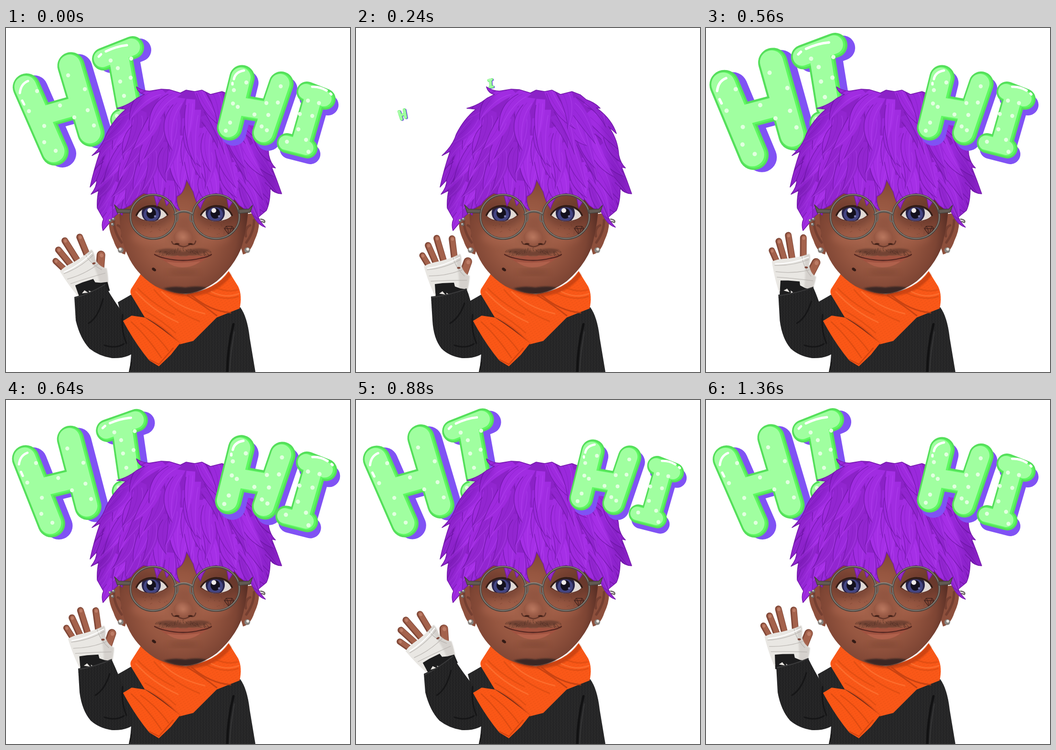
Recreate the animation shown at these times as an HTML page. Size 720 by 720 pixels, loop 1.44 s.

```html
<!DOCTYPE html>
<html lang="en">
<head>
<meta charset="utf-8">
<title>Waving avatar</title>
<style>
html,body{margin:0;width:100%;height:100%;overflow:hidden;background:#fff}
svg{display:block;width:100vw;height:100vh}
</style>
</head>
<body>
<svg id="stage" viewBox="0 0 720 720" fill="none" stroke-linecap="round" stroke-linejoin="round"></svg>
<script>
const LOOP = 1440, STEP = 80;
const svg = document.getElementById('stage');

let seed = 7;
const rnd = (a = 0, b = 1) => {
  seed = (seed * 16807) % 2147483647;
  return a + (b - a) * seed / 2147483647;
};
const path = (d, fill, stroke = 'none', w = 1, more = '') =>
  `<path d="${d}" fill="${fill}" stroke="${stroke}" stroke-width="${w}" ${more}/>`;
const line = (d, stroke, w, more = '') => path(d, 'none', stroke, w, more);
const oval = (x, y, rx, ry, fill, more = '') =>
  `<ellipse cx="${x}" cy="${y}" rx="${rx}" ry="${ry}" fill="${fill}" ${more}/>`;
const grad = (id, stops, at = '') =>
  `<radialGradient id="${id}" ${at}>` + stops.map(([o, c]) => `<stop offset="${o}" stop-color="${c}"/>`).join('') + '</radialGradient>';

// Bubble letters: thick bars [x1,y1,x2,y2,width], dots, shine strokes
function letter(id, bars, dots, shine, shadow) {
  const layer = (color, inset, dx, dy) => `<g transform="translate(${dx} ${dy})">` +
    bars.map(([a, b, c, d, w]) => line(`M${a} ${b}L${c} ${d}`, color, w - inset)).join('') + '</g>';
  return `<g id="${id}">` + layer('#8052f4', 0, ...shadow) + layer('#55df5b', 0, 0, 0) +
    layer('#5ffa62', 8, 0, 0) + layer('#a0ffa0', 12, -2.5, -1) +
    dots.map(([x, y]) => oval(x, y, 4.2, 4.2, '#e2ffe0')).join('') +
    line(shine, '#fff', 5) + '</g>';
}

const HAIR = 'M273 123Q284 131 300 132L325 128L342 129L365 136L377 130L395 133L410 130L428 139L452 133L470 140L482 150Q500 156 511 168L503 167Q535 190 545 221L528 206Q548 232 550 266Q554 284 564 293L556 291Q567 318 577 347Q560 346 553 335Q553 365 545 382L528 396Q534 408 543 417Q528 413 518 394' +
  'L512 383L498 378L488 371L478 358L466 377L462 356L440 346L422 351Q412 362 407 379Q396 362 392 343L378 318Q372 348 358 352Q355 366 364 382Q350 376 345 361L336 372L330 352Q322 358 316 373L310 351L288 346Q270 356 262 370L247 378L243 392L237 386Q222 398 214 411L203 424' +
  'Q199 410 204 400L191 377Q190 357 194 340L178 348Q190 333 190 318L176 333Q184 296 197 258L180 267Q203 246 210 222Q226 190 251 170L232 168Q254 163 274 147L290 139Q277 137 273 123Z';

function locks() {
  const tones = ['#9a29dc', '#a52fe6', '#9226d0', '#a02ce1', '#9e2ade'];
  let out = '';
  for (let y = 365; y > 122; y -= 24) for (let k = 0; k < 12; k++) {
    const x = 190 + k * 33 + rnd(-12, 12), y0 = y + rnd(-12, 12);
    let vx = (x - 382) / 150 + rnd(-.3, .3), vy = .4 + (y0 - 120) / 110;
    const len = rnd(75, 120), h = Math.hypot(vx, vy);
    vx *= len / h; vy *= len / h;
    const w = rnd(13, 21) / len, bend = rnd(-.24, .24);
    const at = (t, s) => (x + vx * t - vy * s).toFixed(1) + ' ' + (y0 + vy * t + vx * s).toFixed(1);
    const side = s => `Q${at(.42, s + bend)} ${at(1, 0)}`;
    out += path(`M${at(0, -w * .7)}Q${at(.5, -w + bend)} ${at(1, 0)}Q${at(.55, w + bend)} ${at(0, w * .7)}Z`, tones[Math.floor(rnd(0, 5))]);
    out += line(`M${at(.15, w * .7)}Q${at(.58, w + bend)} ${at(1, 0)}`, '#7017a8', 1.5, 'opacity=".75"');
    out += line(`M${at(.1, -w * .35)}${side(-w * .5)}`, '#b84cf3', 1.2, 'opacity=".5"');
    out += line(`M${at(.1, w * .25)}${side(w * .3)}`, '#7e1dbb', 1, 'opacity=".55"');
  }
  return out;
}

const eye = (x, id) => `<g clip-path="url(#${id})">` +
  oval(x, 388, 34, 20, '#efece9') + oval(x - 2, 387, 20, 20, '#20204c') + oval(x - 2, 390, 16, 15, '#41478c') +
  oval(x - 2, 388, 10, 11, '#0b0c1c') + oval(x - 5, 382, 5, 5, '#fff') + oval(x + 6, 394, 2.5, 2, '#8087bb') +
  line(`M${x - 32} 384Q${x} 362 ${x + 32} 384`, '#35201c', 6, 'opacity=".45"') + '</g>';

function face() {
  const lens = (x, r) => oval(x, 395, r, 46, '#5b3328', 'opacity=".1"') +
    oval(x, 395, r, 46, 'none', 'stroke="#4b4540" stroke-width="4.5"') +
    oval(x, 394.5, r, 46, 'none', 'stroke="#8f877e" stroke-width="1.6"');
  const ear = (s) => `<g transform="${s}">` +
    path('M246 392Q226 382 216 399Q213 420 225 445Q233 470 249 474L256 450Z', '#8d4f3c') +
    line('M226 402Q225 425 242 449M234 413Q246 418 243 436', '#5d3126', 5, 'opacity=".5"') +
    oval(240, 465, 6, 6, '#86827e') + oval(239, 463, 3, 3, '#e9e6e2') + '</g>';
  let freckles = '';
  for (let i = 0; i < 34; i++) freckles += oval(rnd(0, 56) + (i % 2 ? 284 : 405), rnd(405, 434), .9, .8, '#5e3327', 'opacity=".45"');
  const stubble = [];
  for (let i = 0; i < 130; i++) {
    const u = rnd(-1, 1);
    stubble.push(`M${(371 + u * 56).toFixed(1)} ${(467 + rnd(-4, 5) - 4 * Math.cos(u * 4)).toFixed(1)}l${(u * 3).toFixed(1)} 2`);
  }
  const gem = (x, y) => oval(x, y, 3.3, 3.3, '#6f6c68') + oval(x - 1, y - 1, 1.5, 1.5, '#ddd');
  return ear('') + ear('translate(745 0) scale(-1 1)') +
    path('M234 330L238 400Q240 445 254 474Q271 514 312 540Q344 556 376 556Q408 554 441 530Q476 500 492 462Q502 430 507 385L505 330Q370 270 234 330Z', 'url(#skin)') +
    oval(306, 388, 44, 29, '#512b22', 'opacity=".36" filter="url(#soft)"') +
    oval(440, 388, 44, 29, '#512b22', 'opacity=".36" filter="url(#soft)"') +
    oval(300, 437, 38, 17, '#b96f57', 'opacity=".35" filter="url(#soft)"') +
    oval(436, 437, 34, 17, '#b96f57', 'opacity=".25" filter="url(#soft)"') +
    line('M417 345Q440 333 474 345', '#2c1b18', 7, 'opacity=".75"') +
    `<g id="eyes">${eye(306, 'slitL')}${eye(440, 'slitR')}</g><g id="lids"></g>` + freckles +
    // nose
    path('M357 396Q353 425 345 438Q344 452 358 454Q372 462 387 454Q400 452 398 438Q389 423 387 396Z', '#7b4434', 'none', 0, 'opacity=".4" filter="url(#soft)"') +
    oval(371, 438, 20, 17, 'url(#nose)') + oval(366, 431, 8, 6, '#cd8a70', 'opacity=".55" filter="url(#soft)"') +
    line('M347 447Q349 455 358 452Q371 463 386 452Q395 456 397 446', '#512a21', 2.6, 'opacity=".7"') +
    oval(358, 452, 5, 2, '#32170f', 'opacity=".7"') + oval(386, 452, 5, 2, '#32170f', 'opacity=".7"') +
    // mouth
    path('M314 466Q342 456 371 468Q400 456 427 465Q402 479 371 477Q340 480 314 466Z', '#4a2c24', 'none', 0, 'opacity=".5" filter="url(#tiny)"') +
    line(stubble.join(''), '#3a231d', .8, 'opacity=".5"') +
    path('M318 477Q345 480 359 476Q371 481 383 476Q400 479 425 476Q403 500 370 500Q339 498 318 477Z', '#a05240') +
    path('M336 489Q370 494 407 488Q392 501 368 501Q349 500 336 489Z', '#b0614c') +
    line('M311 474Q319 479 333 482Q371 491 407 482Q424 479 430 474', '#532620', 2.3) +
    oval(371, 511, 32, 4, '#5b3024', 'opacity=".45" filter="url(#soft)"') +
    path('M330 545Q352 539 375 543Q400 539 420 543Q400 556 376 557Q350 556 330 545Z', '#2d2320', 'none', 0, 'opacity=".85" filter="url(#tiny)"') +
    oval(310, 505.5, 4.8, 3, '#341b16', 'transform="rotate(35 310 505)"') +
    line('M457 420L461 415H473L477 420L467 433ZM457 420H477M461 415L464 420L467 433L471 420L473 415', '#43231d', 1.3) +
    '<g id="hair"></g>' +
    lens(308, 47.5) + lens(439.5, 49) +
    line('M353 390Q372 378 391 390', '#5b554f', 5) + line('M354 388Q372 377 390 388', '#9c948a', 1.5) +
    line('M354 405Q361 407 360 390M391 405Q383 408 386 390', '#6d655e', 3) +
    path('M261 380L236 379L227 370L233 387L260 387ZM487 380L508 379L516 371L511 386L488 388Z', '#625a53', '#453f3b', 1.5) +
    gem(223, 411) + gem(218, 403) + gem(225, 400) + line('M533 400Q544 402 541 407L535 405', '#6b6763', 2.5);
}

function scarf() {
  const wool = (d, fill) => path(d, fill) + path(d, 'url(#knit)');
  return wool('M285 510L262 546Q258 553 264 562L290 605Q329 626 364 662L392 655L441 606L489 587Q495 560 486 541L466 509Q440 548 376 557Q316 549 285 510Z', '#fa5818') +
    path('M285 510Q316 549 376 557Q440 548 466 509L472 518Q444 556 390 562Q320 563 285 510Z', '#a4330e', 'none', 0, 'opacity=".5" filter="url(#tiny)"') +
    line('M380 560Q408 576 441 602M389 560Q426 592 470 596', '#b93c10', 3, 'opacity=".75"') +
    line('M276 545Q310 580 352 600M310 548Q345 590 405 614M291 592Q326 612 355 638M420 555Q456 572 486 562M440 544Q465 554 484 548', '#c9450f', 3, 'opacity=".45"') +
    line('M272 552Q307 592 360 616M326 552Q360 585 416 598M430 552Q460 567 487 556', '#ff7a39', 3, 'opacity=".6"') +
    path('M288 604Q330 623 365 662L347 664Q330 630 288 604Z', '#8e2a0b', 'none', 0, 'opacity=".65" filter="url(#tiny)"') +
    wool('M245 613L263 602L291 606Q327 629 364 660L345 684L320 708L300 696Q270 660 245 613Z', '#fb5716') +
    line('M262 615Q295 645 325 690M282 618Q319 645 340 676', '#c4420f', 2.5, 'opacity=".5"') +
    line('M300 694L320 704L350 670', '#b9390c', 2.5, 'opacity=".6"');
}

function hand() {
  const finger = (x1, y1, x2, y2, w) => line(`M${x1} ${y1}L${x2} ${y2}`, '#814838', w) +
    line(`M${x1 + 1} ${y1}L${x2 + 1} ${y2}`, '#a4624c', w - 4) + oval(x1 + 1, y1 + 1, w * .22, w * .25, '#bd7c66');
  return finger(139, 476, 156, 504, 13) + finger(151, 455, 170, 498, 14) + finger(169, 440, 184, 490, 14) +
    finger(201, 441, 207, 490, 14) + finger(234, 489, 222, 522, 18) +
    path('M142 499Q151 493 166 490Q193 485 218 473Q222 481 220 496Q225 514 238 519Q237 536 231 558L166 562Q153 537 142 499Z', '#e9e7e3') +
    path('M207 478L218 473Q222 481 220 496Q225 514 238 519Q237 536 231 558L214 558Q220 530 207 478Z', '#bdb8b3', 'none', 0, 'opacity=".45" filter="url(#tiny)"') +
    line('M149 506Q185 503 218 485M153 519Q190 519 223 506M157 530Q189 528 232 528M203 480Q208 501 227 519', '#b6b2ae', 1.5, 'opacity=".75"') +
    line('M150 503Q185 498 217 480', '#fff', 2) + oval(215, 502, 3.5, 2, '#81483a') +
    path('M165 536L181 534L205 533L207 541L218 545L232 547L232 566L167 566Z', '#1d1d1e') +
    path('M174 556l7-5 6 7zM189 554l5 3-4 3zM163 548l4 10-5-3z', '#e7e4e0');
}

const dotsLH = [[130, 99], [65, 132], [165, 128], [113, 162], [143, 187], [48, 174], [171, 172], [80, 205], [80, 239], [104, 257], [184, 204]];
const dotsLI = [[261, 104], [239, 112], [234, 84], [262, 64], [219, 68], [247, 142], [232, 184]];
const dotsRH = [[503, 114], [477, 130], [475, 158], [520, 181], [485, 165], [545, 157], [549, 182], [569, 156], [535, 206], [546, 214], [469, 198], [460, 215], [575, 122]];
const dotsRI = [[655, 157], [632, 152], [641, 184], [615, 180], [612, 212], [628, 234], [633, 259], [588, 238]];

svg.innerHTML = `<defs>
${grad('skin', [[0, '#a7674f'], [.5, '#965640'], [.82, '#7e4534'], [1, '#5b3026']], 'gradientUnits="userSpaceOnUse" cx="360" cy="435" r="148"')}
${grad('nose', [[0, '#b6745c'], [1, '#925440']])}
${grad('shade', [[0, '#3a0468'], [1, '#3a0468']])}
<filter id="soft" x="-40%" y="-60%" width="180%" height="220%"><feGaussianBlur stdDeviation="7"/></filter>
<filter id="tiny" x="-20%" y="-40%" width="140%" height="180%"><feGaussianBlur stdDeviation="1.6"/></filter>
<pattern id="knit" width="7" height="5" patternUnits="userSpaceOnUse" patternTransform="rotate(-32)"><path d="M0 2.5H4" stroke="#c63f0c" opacity=".28"/></pattern>
<pattern id="rib" width="6" height="6" patternUnits="userSpaceOnUse"><path d="M1 0L3 3L1 6" stroke="#3b3b3b" opacity=".4"/></pattern>
<clipPath id="hairClip"><path d="${HAIR}"/></clipPath>
<clipPath id="slitL"><path id="openL"/></clipPath><clipPath id="slitR"><path id="openR"/></clipPath>
</defs><rect width="720" height="720" fill="#fff"/>` +
  letter('lh', [[43, 124, 102, 259, 58], [136, 79, 178, 220, 57], [80, 184, 158, 162, 50]], dotsLH, 'M29 136Q31 117 46 111M34 152L38 160', [16, 4]) +
  letter('li', [[204, 65, 265, 41, 48], [238, 60, 256, 160, 53], [241, 192, 300, 176, 46]], dotsLI, 'M194 60L199 55M209 49Q232 38 253 36', [15, 5]) +
  path('M234 574L262 558L300 600L440 605L490 584Q505 604 510 648L522 720H259L262 682Z', '#252526') +
  path('M234 574L262 558L300 600L440 605L490 584Q505 604 510 648L522 720H259L262 682Z', 'url(#rib)') +
  line('M476 620Q464 667 463 720', '#121213', 5) + line('M478 636Q470 680 468 720', '#363637', 2) +
  line('M262 700L258 720', '#111', 2) +
  `<g id="hand">${hand()}</g><path id="sleeve" fill="#222223"/><path id="weave" fill="url(#rib)"/><path id="folds" stroke="#111112" stroke-width="3" opacity=".7"/><path id="cuff" stroke="#3a3a3b" stroke-width="2"/>` +
  scarf() + face() +
  letter('rh', [[494, 104, 468, 209, 53], [576, 117, 541, 220, 52], [487, 164, 556, 176, 50]], dotsRH, 'M477 107Q480 92 498 89M474 115L474 118', [8, 11]) +
  letter('ri', [[630, 134, 668, 149, 44], [646, 145, 618, 242, 48], [588, 241, 631, 252, 42]], dotsRI, 'M641 123Q656 122 671 131M679 137L681 139', [6, 12]);

const $ = id => document.getElementById(id);
$('hair').innerHTML = path(HAIR, '#8b22c7') + `<g clip-path="url(#hairClip)">${locks()}` +
  line('M176 333Q208 200 273 150M190 380Q206 330 206 300M550 266Q556 310 550 345M528 206Q552 280 545 385', '#430677', 28, 'opacity=".2" filter="url(#soft)"') + '</g>' +
  line(HAIR, '#7419ab', 1.5);

// time, turn, palm dx dy, cuff left x y, cuff right x y
const ARM = [
  [0, -15.5, -28, -3, 143, 563, 207, 537],
  [80, -23, -36, 3, 141, 570, 203, 537],
  [240, 0, 0, 0, 157, 562, 231, 546],
  [400, 19, 2, -11, 151, 553, 228, 540],
  [640, -1, -12, 0, 151, 562, 221, 543],
  [880, -24, -38, 6, 142, 573, 203, 536],
  [1120, 0, 0, 0, 157, 562, 231, 546],
  [1240, 14, -2, -8, 152, 556, 227, 541],
  [1360, 2, -20, -2, 147, 558, 214, 541]];
// time, size, first-letter dx dy, second-letter dx dy, turn
const LEFT = [[0, 1, 0, 0, 0, 0, 0], [79, 1, 0, 0, 0, 0, 0], [80, 0, -12, 10, 40, 5, 6], [200, 0, -12, 10, 40, 5, 6], [240, .11, -12, 10, 39, 5, 6], [320, .7, -5, 4, 14, 2, 2],
  [400, 1.015, -1, 0, 2, 0, 0], [480, 1.1, 0, 0, 0, 0, 0], [560, 1.08, 0, 0, 2, 0, 1], [640, .99, -4, 1, 6, 0, 2], [720, .96, -2, 1, 3, 0, 1], [880, .995, 0, 0, 0, 0, 0], [960, 1, 0, 0, 0, 0, 0]];
const RIGHT = [[0, 1], [79, 1], [80, 0], [360, 0], [400, .11], [480, .7], [560, 1], [640, 1.05], [720, 1.055], [800, .99], [880, .94], [960, .965], [1040, .99], [1120, 1]];
const LIDS = [[0, 1], [960, 1], [1040, .55], [1120, 0], [1200, .5], [1280, 1]];

function lerp(rows, t) {
  let i = rows.length - 1;
  while (rows[i][0] > t) i--;
  const a = rows[i], b = rows[i + 1] || a, u = b === a ? 0 : (t - a[0]) / (b[0] - a[0]);
  return a.slice(1).map((v, k) => v + (b[k + 1] - v) * u);
}
// Smooth cyclic curve through the rows
function curve(rows, t) {
  const n = rows.length;
  let i = n - 1;
  while (rows[i][0] > t) i--;
  const row = k => rows[(k + n) % n], time = k => row(k)[0] + LOOP * Math.floor(k / n);
  const t1 = time(i), t2 = time(i + 1), span = t2 - t1, u = (t - t1) / span;
  return row(i).slice(1).map((p, j) => {
    const q = row(i + 1)[j + 1];
    const m = (q - row(i - 1)[j + 1]) / (t2 - time(i - 1)) * span;
    const s = (row(i + 2)[j + 1] - p) / (time(i + 2) - t1) * span;
    return p + u * (m + u * (3 * (q - p) - 2 * m - s + u * (2 * (p - q) + m + s)));
  });
}
const place = (id, x, y, s, dx = 0, dy = 0, turn = 0) => {
  $(id).setAttribute('visibility', s > 0 ? 'visible' : 'hidden');
  $(id).setAttribute('transform', `translate(${x + dx} ${y + dy}) rotate(${turn}) scale(${Math.max(s, .001)}) translate(${-x} ${-y})`);
};

function draw(t) {
  const [turn, dx, dy, lx, ly, rx, ry] = curve(ARM, t);
  $('hand').setAttribute('transform', `translate(${dx} ${dy}) rotate(${turn} 190 510)`);
  const k = lx - 157;
  const rim = `Q${(lx + rx) / 2 + 2} ${(ly + ry) / 2 + 5} ${rx} ${ry}`;
  const d = `M${lx} ${ly}${rim}Q${rx + 9} ${ry + 19} 244 596L260 640L264 682Q247 692 222 691Q195 687 ${179 + k * .3} 671Q${162 + k * .5} 650 ${160 + k} 612Z`;
  $('sleeve').setAttribute('d', d);
  $('weave').setAttribute('d', d);
  $('folds').setAttribute('d', `M244 600Q240 630 252 660M${rx - 4} ${ry + 30}Q${rx - 14} 606 ${rx - 34} 618M206 664Q230 672 247 661`);
  $('cuff').setAttribute('d', `M${lx + 2} ${ly + 2}${rim}`);

  const [s, hx, hy, ix, iy, tilt] = lerp(LEFT, t);
  place('lh', 109, 171, s, hx, hy, tilt);
  place('li', 242, 110, s, ix, iy, tilt);
  const [r] = lerp(RIGHT, t);
  place('rh', 523, 161, r);
  place('ri', 631, 197, r);

  const [open] = lerp(LIDS, t);
  let lids = '';
  for (const [x, id, flip] of [[306, 'openL', 1], [440, 'openR', -1]]) {
    const top = 403 - 38 * open, a = x - 33 * flip, b = x + 32 * flip;
    const arc = `M${a} 392Q${x} ${top + 7 * (1 - open)} ${b} 391`;
    $(id).setAttribute('d', `M${a} 392C${x - 22 * flip} ${top + 1} ${x + 18 * flip} ${top + 1} ${b} 391Q${x + 14 * flip} 406 ${x} 405Q${x - 21 * flip} 405 ${a} 392Z`);
    if (open < .9) lids += path(`M${a} 392Q${x} 352 ${b} 391Q${x} ${top + 7} ${a} 392Z`, '#6f3e30', 'none', 0, 'opacity=".75"') + line(arc, '#2d1914', 3);
    else lids += line(`M${a} 392C${x - 22 * flip} ${top + 1} ${x + 18 * flip} ${top + 1} ${b} 391`, '#2d1914', 3.5);
    if (open > .2) lids += line(`M${a + 5 * flip} 398Q${x} 412 ${b} 394`, '#603329', 1.3);
  }
  $('eyes').setAttribute('visibility', open > .05 ? 'visible' : 'hidden');
  $('lids').innerHTML = lids;
}

let last = -1;
function tick() {
  const t = Math.floor(performance.now() % LOOP / STEP) * STEP;
  if (t !== last) draw(last = t);
  requestAnimationFrame(tick);
}
tick();
</script>
</body>
</html>
```
